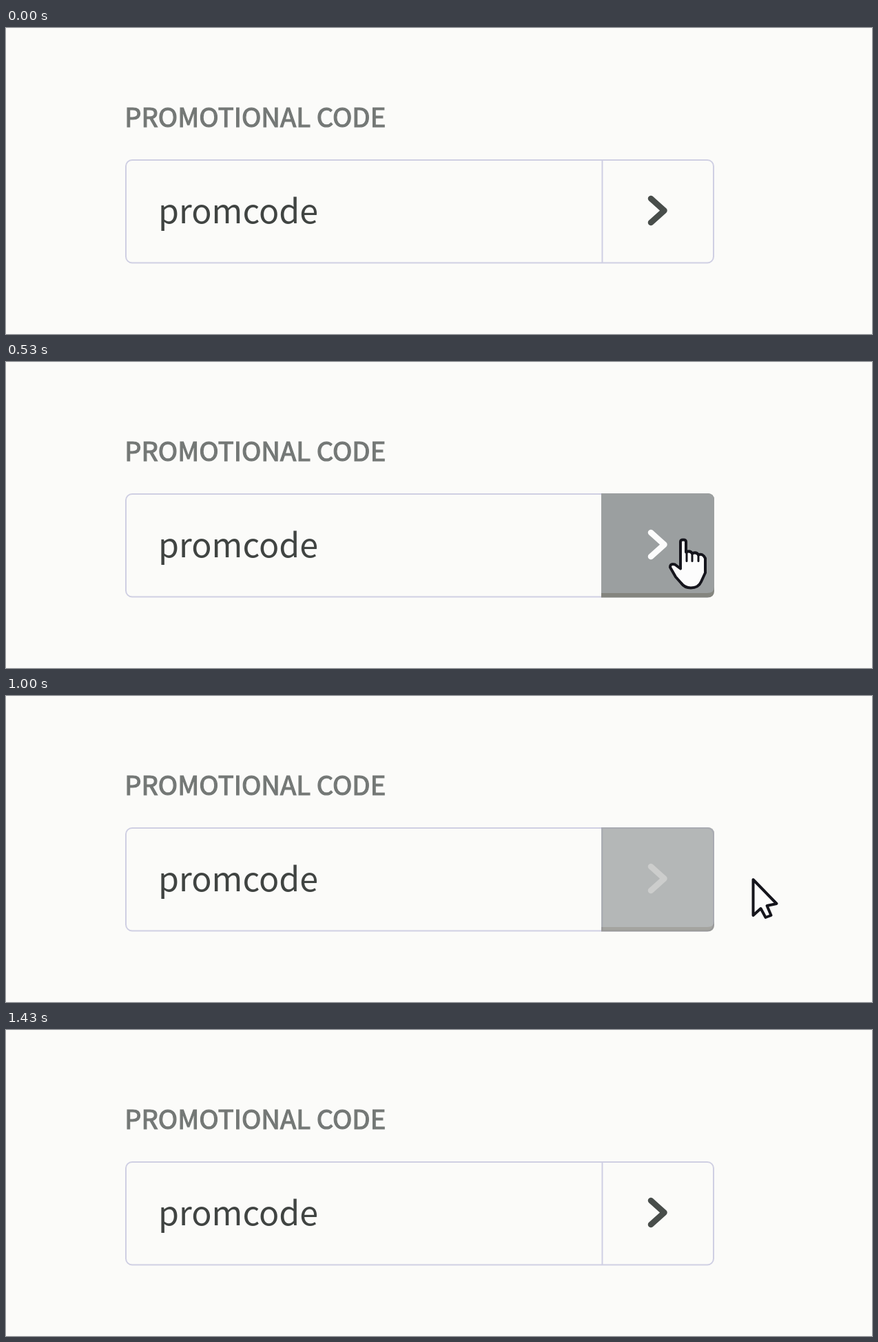
These frames come from a looping animation (1257x445 px, 1460 ms). An HTML page:

```html
<!DOCTYPE html>
<html lang="en">
<head>
<meta charset="utf-8">
<style>
  html, body { margin: 0; width: 100%; height: 100%; overflow: hidden; background: #fbfbf9; }
  svg { display: block; width: 100%; height: 100%; }
  text { font-family: "Noto Sans CJK SC", "Noto Sans CJK JP", "Noto Sans CJK", "Open Sans", sans-serif; }
  .label { font-size: 38.3px; fill: #747876; stroke: #747876; stroke-width: 1.2px; }
  .value { font-size: 48.4px; fill: #404442; }
  .line { fill: none; stroke: #cfcfe3; stroke-width: 2; }
  .cursor { fill: #fcfcfc; stroke: #15151c; stroke-width: 4; stroke-linejoin: round; stroke-linecap: round; }
  #chevron { fill: none; stroke-width: 8.5; stroke-linejoin: round; stroke-linecap: round; }
</style>
</head>
<body>
<svg viewBox="0 0 1257 445">
  <text class="label" x="172.3" y="144">PROMOTIONAL CODE</text>
  <rect class="line" x="174" y="192" width="853" height="149.5" rx="9"/>
  <path class="line" d="M865.5 192V341"/>
  <text class="value" x="221" y="284">promcode</text>
  <g id="hover">
    <path fill="#84857f" d="M864 191H1018Q1028 191 1028 201V333Q1028 342.5 1018 342.5H864Z"/>
    <path fill="#9b9fa0" d="M864 191H1018Q1028 191 1028 201V327Q1028 336 1018 336H864Z"/>
  </g>
  <path id="chevron" d="M936 248L955.5 265.500L936 283"/>
  <g id="hand" class="cursor">
    <path d="M-4 3Q-4 0 0 0Q4 0 4 3V18Q10 15 13 20Q19 17 22 22Q28 19 32 27V48L26 61Q22 70 11 70Q2 70 -3 63L-11 54L-19 40Q-19 34 -12 36L-4 42Z"/>
    <path fill="none" stroke-width="3" d="M5 18V31M13 20V31M22 22V31"/>
  </g>
  <path id="arrow" class="cursor" d="M0 0V52L11 42L18 55L26 52L20 38L34 35Z"/>
</svg>
<script>
const LOOP = 1460;
const BUTTON_RIGHT = 1030;
const [hover, chevron, hand, arrow] =
  ["hover", "chevron", "hand", "arrow"].map(id => document.getElementById(id));

const progress = (t, from, to) => Math.min(1, Math.max(0, (t - from) / (to - from)));
const smooth = p => p * p * (3 - 2 * p);
const mix = (a, b, p) => a + (b - a) * p;

function cursorX(t) {
  if (t < 300) return mix(1300, 1001, 1 - (1 - progress(t, 60, 300)) ** 2);
  if (t < 860) return mix(1001, 983, smooth(progress(t, 300, 450)));
  return mix(983, 1300, progress(t, 860, 1050) ** 3.85);
}

function place(node, x, y, visible) {
  node.setAttribute("transform", `translate(${x} ${y})`);
  node.style.display = visible ? "" : "none";
}

function draw(t) {
  const x = cursorX(t);
  const over = x < BUTTON_RIGHT;
  const lit = smooth(progress(t, 150, 290)) * (1 - smooth(progress(t, 955, 1090)));
  hover.setAttribute("opacity", lit);
  chevron.setAttribute("stroke",
    `rgb(${[72, 77, 74].map(c => Math.round(mix(c, 252, lit))).join()})`);
  place(hand, x, 258.5, over);
  place(arrow, x + 1, 267, !over);
}

function tick() {
  draw(performance.now() % LOOP);
  requestAnimationFrame(tick);
}
tick();
</script>
</body>
</html>
```
